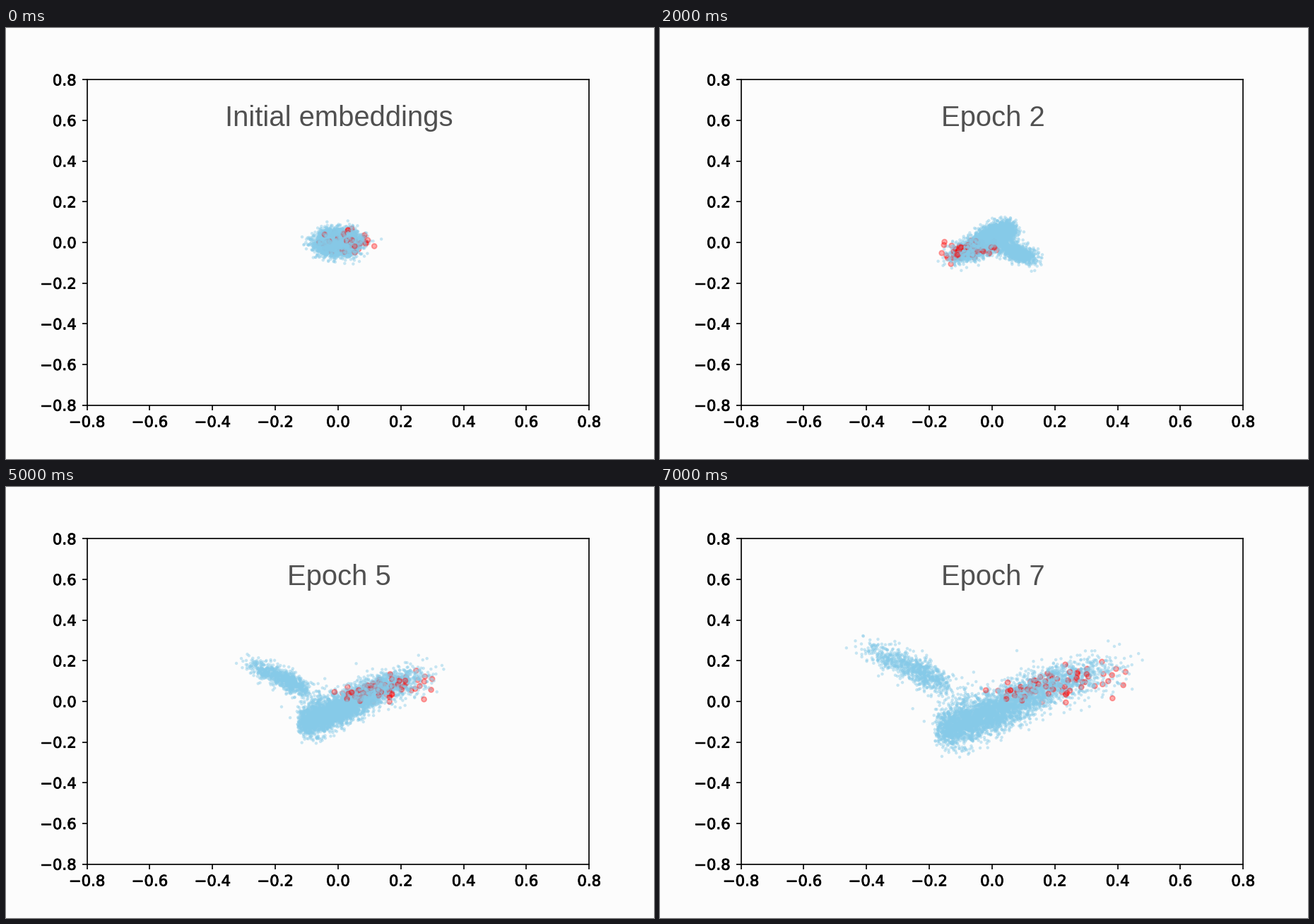
Write a matplotlib script that moves like this. It is 917x611 px and loops after 8 s.

```python
import numpy as np
import matplotlib.pyplot as plt
from matplotlib.animation import FuncAnimation
from matplotlib.patheffects import withStroke

W, H, DPI = 917, 611, 128
PT = 152.8 / DPI  # all point sizes follow a 6 x 4 inch layout
BG = "#fcfcfc"
LAST = 7
N_WING, N_BULK, N_STRAY, N_RED = 850, 4300, 70, 80
rng = np.random.default_rng(11)


# Layout of each group of points at the last epoch
def make_wing(n):
    x = -0.13 - 0.33 * rng.beta(2, 3.4, n)
    y = 0.155 - 0.663 * (x + 0.245) + rng.normal(0, 0.034, n)
    return np.column_stack([x + rng.normal(0, 0.014, n), y])


def make_bulk(n):
    x = -0.165 + 0.66 * rng.beta(1.3, 3, n)
    y = 0.19 * np.tanh((x - 0.08) / 0.26) + rng.normal(0, 0.05, n)
    return np.column_stack([x + rng.normal(0, 0.018, n), y])


def make_strays(n):
    return rng.normal((-0.1, 0.02), (0.06, 0.055), (n, 2))


def make_red(n):
    outer = [(.425, .145), (.418, .08), (.395, .16), (.355, .135),
             (.35, .195), (.235, -.005), (-.02, .055)]
    x = rng.normal(0.175, 0.08, n - len(outer))
    y = 0.075 + 0.25 * (x - 0.175) + rng.normal(0, 0.035, len(x))
    return np.vstack([outer, np.column_stack([x, y])])


wing = make_wing(N_WING)
body = np.vstack([make_bulk(N_BULK), make_strays(N_STRAY), make_red(N_RED)])
n_blue = N_WING + N_BULK + N_STRAY
start = np.vstack([rng.normal(0, (0.032, 0.029), (n_blue, 2)),
                   rng.normal((0.02, 0), (0.035, 0.027), (N_RED, 2))])

# Red and blue points are stacked in mixed order
order = rng.permutation(len(start))
is_red = order >= n_blue


def points_at(e):
    if e == 0:
        return start[order]
    t = e / LAST
    grow_x = 0.16 + 0.84 * t ** 1.3
    grow_y = 0.24 + 0.76 * t ** 1.15
    spread = np.vstack([wing * grow_x, body * (grow_x, grow_y)])
    flip = (-1 if e <= 3 else 1, -1 if 2 <= e <= 3 else 1)
    return ((spread + (1 - t) ** 2 * start) * flip)[order]


fig = plt.figure(figsize=(W / DPI, H / DPI), dpi=DPI, facecolor=BG)
ax = fig.add_axes([0.125, 0.125, 0.775, 0.755], facecolor=BG)
ax.set(xlim=(-0.8, 0.8), ylim=(-0.8, 0.8))
ticks = np.linspace(-0.8, 0.8, 9).round(1)
ax.set_xticks(ticks)
ax.set_yticks(ticks)
ax.tick_params(length=3.5 * PT, width=0.8 * PT, pad=3.5 * PT,
               labelsize=10 * PT, labelfontfamily="DejaVu Sans")
for spine in ax.spines.values():
    spine.set_linewidth(0.8 * PT)
for label in ax.get_xticklabels() + ax.get_yticklabels():
    label.set_path_effects([withStroke(linewidth=0.45, foreground="black")])

red, blue = (1, 0, 0, 0.33), (0.525, 0.792, 0.91, 0.45)
dots = ax.scatter(*points_at(0).T, s=np.where(is_red, 15.5, 6.2),
                  c=[red if r else blue for r in is_red],
                  linewidths=np.where(is_red, 1.0, 0), zorder=1)
title = fig.text(471 / W, 1 - 139 / H, "", ha="center", va="baseline",
                 family="Liberation Sans", size=40 * 72 / DPI, color="#505050")


def update(e):
    dots.set_offsets(points_at(e))
    title.set_text(f"Epoch {e}" if e else "Initial embeddings")
    return dots, title


anim = FuncAnimation(fig, update, frames=LAST + 1, interval=1000, repeat=True,
                     repeat_delay=0, blit=False)
plt.show()
```
